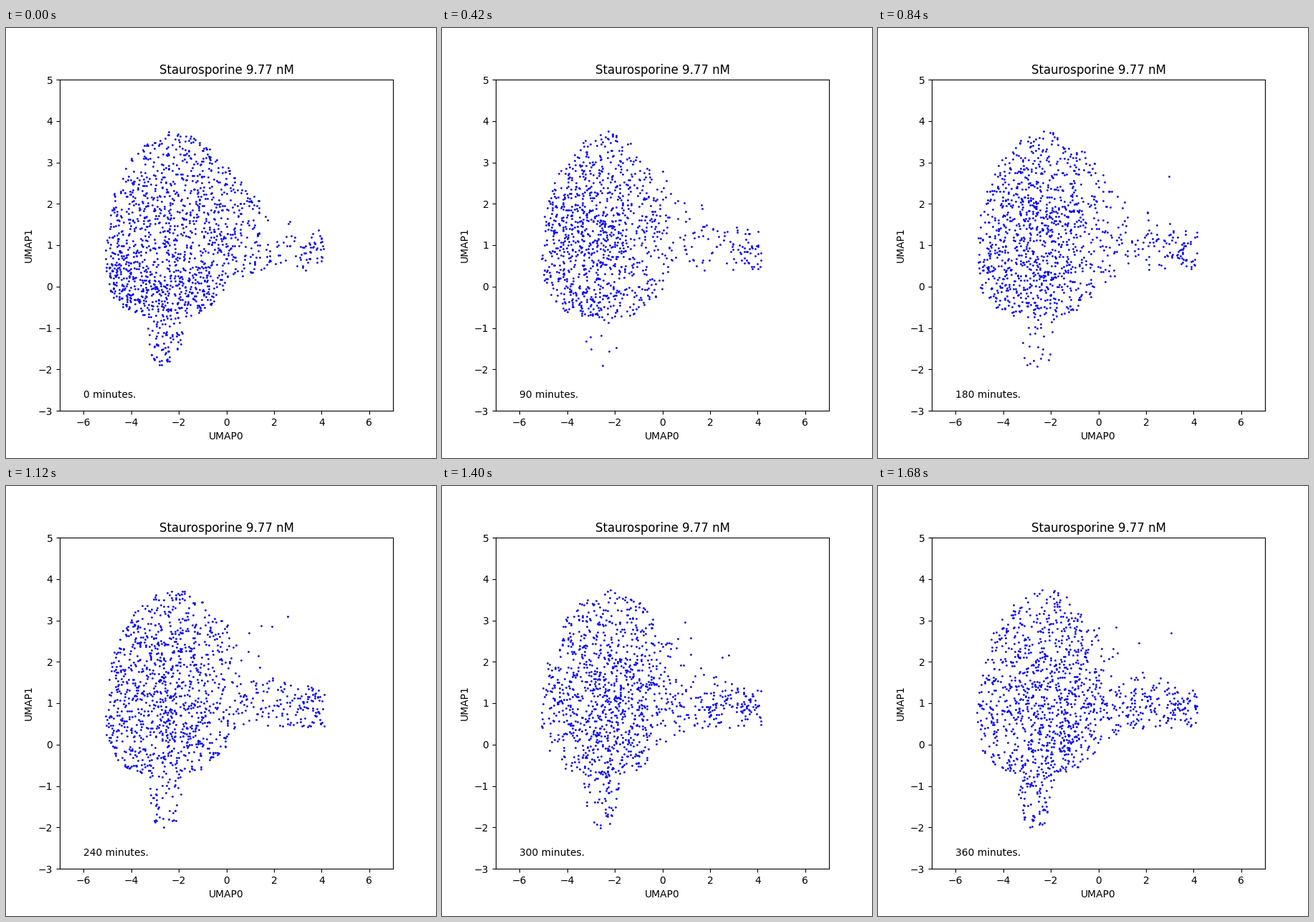
A matplotlib script that plays this animation: 600x600 px, repeating every 1.82 s.

```python
import numpy as np
import matplotlib.pyplot as plt
from matplotlib.animation import FuncAnimation

FRAMES = 13
STEP_MS = 140
MINUTES = 30
PEAK = 130  # upper bound of dots per unit area


def bump(dist, width):
    return np.exp(-(dist / width) ** 2)


def smoothstep(p):
    return p * p * (3 - 2 * p)


def sigmoid(x, edge, width):
    """Fall from 1 to 0 around the edge."""
    return 1 / (1 + np.exp((x - edge) / width))


def outline(x):
    """Lower and upper edge of the cloud: rounded on the left, tapering right."""
    d = x + 2.2
    u = np.clip(-d / 2.9, 0, 1)
    top = np.where(d < 0, 0.8 + 2.95 * np.sqrt(1 - u**2),
                   1.25 + 2.5 * bump(d, 3.5))
    low = np.where(d < 0, 0.8 - 1.55 * np.cbrt(1 - u**3),
                   0.4 - 1.15 * np.exp(-(np.abs(d) / 2.3) ** 3))
    return low, top


def density(x, y, step):
    p = step / (FRAMES - 1)
    early = np.exp(-2 * step)
    settled = 1 - early

    # A crowd leaves the lower left edge, widens and drifts right
    dist = np.hypot(x + 4.6 - 0.9 * settled - 1.7 * p, y - 0.3 - 0.6 * settled)
    crowd = (60 - 18 * p) * bump(dist, 1 + settled)
    core = 28 + 18 * early + crowd + 40 * early * bump(y + 0.2, 0.5)

    # The arm fills up while its tip stays occupied
    bridge = 8 + 40 * smoothstep(p)
    tip = 34 * bump(x - 3.6, 0.5)
    arm = (bridge + tip) * bump(y - 0.9, 0.5) + 5
    arm = arm + 35 * early * sigmoid(x, 1.4, 0.15)

    mix = sigmoid(x, 0.2, 0.15)
    low, top = outline(x)
    inside = (x > -5.1) & (x < 4.15) & (y > low) & (y < top)
    rate = np.where(inside, mix * core + (1 - mix) * arm, 0)

    # The stem empties, then fills again
    stem = np.hypot((x + 2.6) / 0.78, (y + 1) / 1.07) < 1
    rate = np.where(stem & ~inside, 6 + 4 * abs(step - 3) + 25 * early, rate)

    stray = (x > 0.3) & (x < 3.2) & (y > 1.2) & (y < 3.1)
    return np.where(stray & ~inside, 1.5 * p, rate)


def cells(step):
    """Scatter the cell population of one time step."""
    rng = np.random.default_rng(100 + step)
    low, high = np.array([-5.2, -2.1]), np.array([4.2, 3.8])
    count = int(PEAK * np.prod(high - low))
    x, y = rng.uniform(low, high, (count, 2)).T
    keep = rng.uniform(0, PEAK, count) < density(x, y, step)
    return x[keep], y[keep]


fig, ax = plt.subplots(figsize=(6, 6), dpi=100)
ax.set(xlim=(-7, 7), ylim=(-3, 5), xlabel="UMAP0", ylabel="UMAP1",
       title="Staurosporine 9.77 nM")
dots, = ax.plot([], [], "b.", markersize=2)
label = ax.text(-6, -2.69, "")


def update(step):
    dots.set_data(*cells(step))
    label.set_text(f"{step * MINUTES} minutes.")
    return dots, label


anim = FuncAnimation(fig, update, frames=FRAMES, interval=STEP_MS,
                     repeat=True, repeat_delay=0)
plt.show()
```
